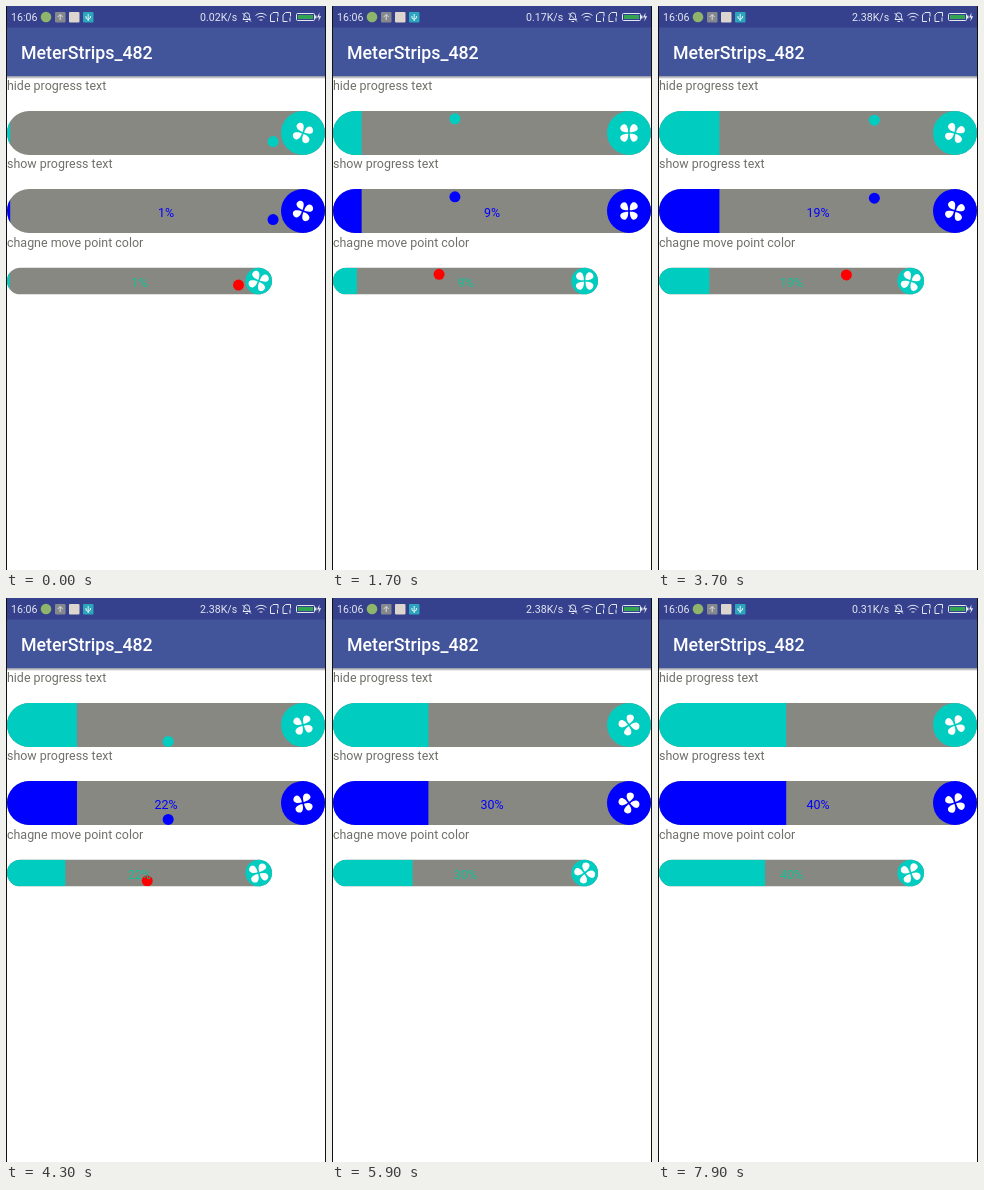
Recreate the animation shown at these times as an HTML page. Size 320 by 564 pixels, loop 8000 ms.

```html
<!DOCTYPE html>
<html lang="en">
<head>
<meta charset="utf-8">
<title>Progress bars</title>
<style>
  html, body { margin: 0; width: 100%; height: 100%; overflow: hidden; background: #fff; }
  svg { display: block; width: 100vw; height: 100vh; }
  text { font-family: Roboto, "Liberation Sans", sans-serif; }
  .status { font-size: 10.6px; fill: #e4e6f2; }
  .label { font-size: 12.44px; fill: #70706a; }
  .percent { font-size: 12.44px; text-anchor: middle; }
</style>
</head>
<body>
<svg viewBox="0 0 320 564" preserveAspectRatio="none">
  <defs>
    <linearGradient id="shadow" x1="0" y1="0" x2="0" y2="1">
      <stop offset="0" stop-color="#999"/>
      <stop offset="1" stop-color="#fff"/>
    </linearGradient>
    <g id="fan" fill="#fff">
      <path id="blade" d="M0-1.2C-2-3-4-5.4-3.5-8C-3-10.8 1.6-11.6 3.3-9C4.6-6.8 2-3 0-1.2Z"/>
      <use href="#blade" transform="rotate(90)"/>
      <use href="#blade" transform="rotate(180)"/>
      <use href="#blade" transform="rotate(270)"/>
    </g>
  </defs>
  <rect width="320" height="564" fill="#fff"/>
  <rect width="320" height="22" fill="#35418c"/>
  <rect y="21.5" width="320" height="49" fill="#43559a"/>
  <rect y="70.5" width="320" height="2.5" fill="url(#shadow)"/>

  <text class="status" x="5" y="15">16:06</text>
  <circle cx="40" cy="11" r="5.3" fill="#8fb56a"/>
  <rect x="49" y="6" width="10.5" height="10.5" rx="1" fill="#85888c"/>
  <path d="M54.2 14V8.5M51.7 11l2.5-2.5 2.5 2.5" fill="none" stroke="#ddd"/>
  <rect x="63" y="6" width="10.5" height="10.5" rx="1" fill="#dcd6cf"/>
  <rect x="77" y="6" width="10.5" height="10.5" rx="1" fill="#2ba6bd"/>
  <path d="M82.2 15V8M80 10v2l2.2 1.5 2.2-1.5v-2" fill="none" stroke="#e4f4f6"/>
  <text class="status" id="speed" x="194" y="15"></text>
  <g fill="none" stroke="#e4e6f2">
    <path d="M237 13.5h7.5l-1-1.8V9.5a2.7 2.7 0 0 0-5.4 0v2.2zM239.500 15.500h2.500M236.500 7l8.500 8.500"/>
    <path d="M249.500 9.500a8 8 0 0 1 11 0M251.500 11.800a5 5 0 0 1 7 0M253.500 14h3"/>
    <path id="sim" d="M269 15.500h-4.500v-6.500l2.500-2.500h5v4M271.500 11.500v4"/>
    <use href="#sim" x="12.5"/>
    <rect x="290.500" y="7.500" width="18" height="7" rx="1"/>
  </g>
  <rect x="292" y="9" width="15" height="4" fill="#33a552"/>
  <path d="M309 9.500h1.500v3H309zM313.500 6.500l-2.500 5h2l-.700 4 2.900-5.200h-2z" fill="#e4e6f2"/>
  <text x="15" y="53" font-size="17.78" font-weight="500" fill="#fff">MeterStrips_482</text>

  <text class="label" x="1" y="83.500">hide progress text</text>
  <text class="label" x="1" y="162">show progress text</text>
  <text class="label" x="1" y="240.700">chagne move point color</text>
  <g id="bars"></g>
  <path d="M.5 0V564M319.500 0V564" stroke="#111"/>
</svg>
<script>
const LOOP = 8000, STEP = 100, LEFT = 1, DOT = 5.5;
const TEAL = '#00cdc0', BLUE = '#0000ff';
const SPEEDS = [[6700, '0.31'], [3700, '2.38'], [700, '0.17'], [0, '0.02']];

function el(parent, tag, attrs) {
  const node = document.createElementNS('http://www.w3.org/2000/svg', tag);
  set(node, attrs);
  return parent.appendChild(node);
}

function set(node, attrs) {
  for (const key in attrs) node.setAttribute(key, attrs[key]);
}

function makeBar({ top, width, height, color, dotColor, textColor }) {
  const root = document.getElementById('bars');
  const r = height / 2, cy = top + r, fanX = LEFT + width - r;
  const pill = { x: LEFT, y: top, width, height, rx: r };
  const clip = el(root, 'clipPath', { id: 'clip' + top });
  el(clip, 'rect', pill);
  el(root, 'rect', { ...pill, fill: '#888882' });
  const group = el(root, 'g', { 'clip-path': `url(#clip${top})` });
  const dot = el(group, 'circle', { r: DOT, fill: dotColor });
  const fill = el(group, 'rect', { x: LEFT, y: top, height, fill: color });
  const text = textColor && el(root, 'text', {
    class: 'percent', x: LEFT + width / 2, y: cy + 5.5, fill: textColor
  });
  el(root, 'circle', { cx: fanX, cy, r, fill: color });
  const fan = el(root, 'use', { href: '#fan' });

  return (percent, phase, angle) => {
    const u = 1 - phase;
    set(dot, {
      cx: LEFT + u * (width - height),
      cy: cy - (r - DOT) * Math.sin(u * 6 * Math.PI)
    });
    set(fill, { width: width * percent / 100 });
    set(fan, { transform: `translate(${fanX} ${cy}) rotate(${angle})` });
    if (text) text.textContent = percent + '%';
  };
}

const bars = [
  { top: 105, width: 318, height: 44, color: TEAL, dotColor: TEAL },
  { top: 183, width: 318, height: 44, color: BLUE, dotColor: BLUE, textColor: BLUE },
  { top: 261.7, width: 265, height: 26.6, color: TEAL, dotColor: '#ff0000', textColor: '#10c096' }
].map(makeBar);
const speed = document.getElementById('speed');

function render(ms) {
  const t = Math.floor(ms / STEP) * STEP;
  const percent = 1 + Math.floor(t / 200);
  // The dot starts slightly slower than it goes on.
  const travel = t < 1700 ? 0.029 + t * 0.0003094 : 0.555 + (t - 1700) * 0.0003295;
  const angle = travel * 300 - 122;
  bars.forEach(draw => draw(percent, travel % 1, angle));
  speed.textContent = SPEEDS.find(([from]) => t >= from)[1] + 'K/s';
}

const start = performance.now();
function tick() {
  render((performance.now() - start) % LOOP);
  requestAnimationFrame(tick);
}
render(0);
requestAnimationFrame(tick);
</script>
</body>
</html>
```
